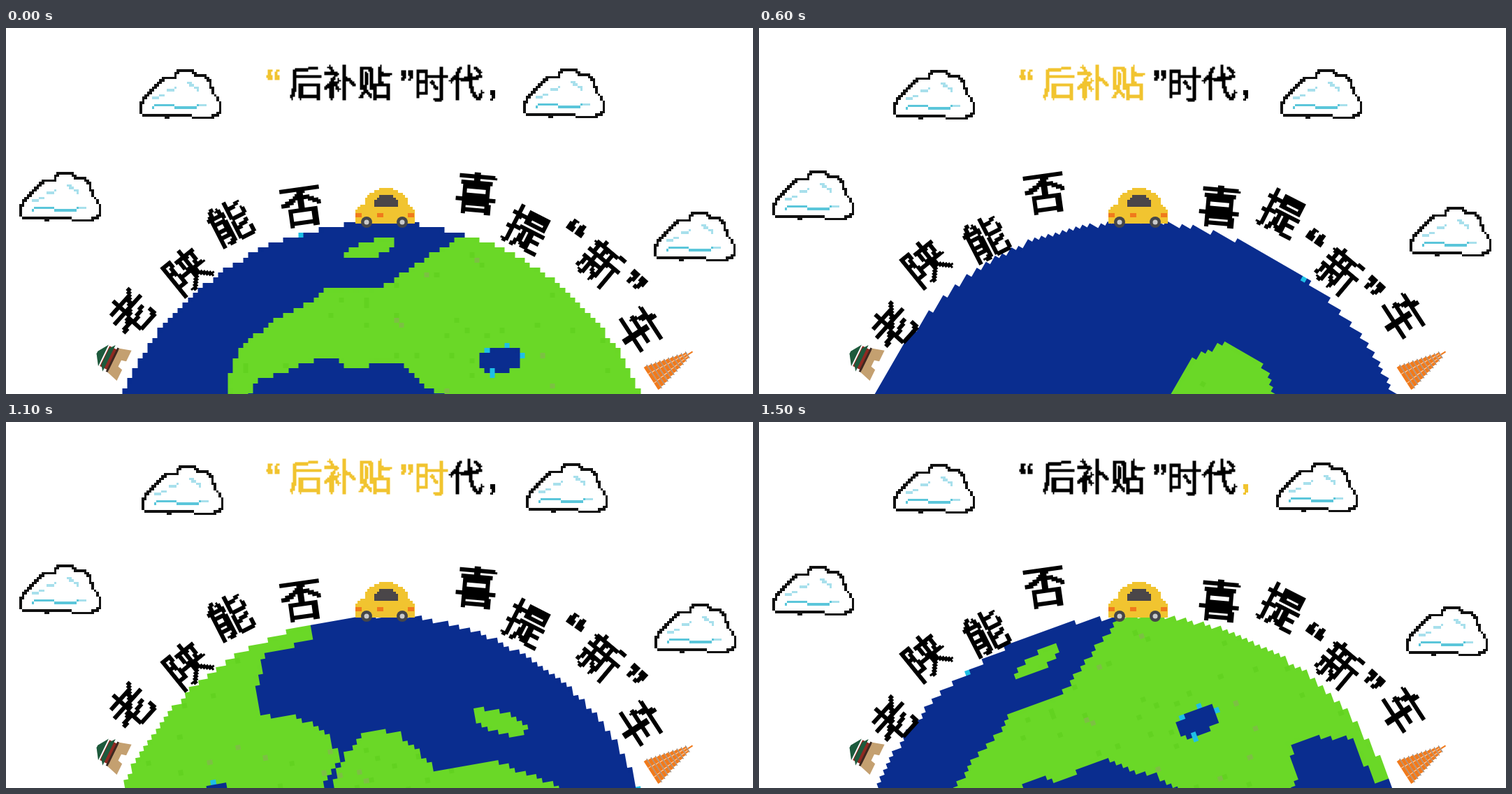
Write an HTML page with a canvas that moves like this. It is 1069 px wide and 524 px high and loops after 1.6 s.

```html
<!DOCTYPE html>
<html lang="zh">
<head>
<meta charset="utf-8">
<style>
  html, body { margin: 0; width: 100%; height: 100%; overflow: hidden; background: #fff; }
  canvas { display: block; }
</style>
</head>
<body>
<canvas id="stage" width="1069" height="524"></canvas>
<script>
const ctx = document.getElementById('stage').getContext('2d');
const GOLD = '#f1c430', BLUE = '#0a2d8f', GREEN = '#6ad827', CYAN = '#1fbfe6', ORANGE = '#f07a1c';
const CENTRE = { x: 537.5, y: 678 };
const rad = deg => deg * Math.PI / 180;
const shape = points => new Path2D('M' + points + 'Z');

function newLayer(w, h) {
  const canvas = document.createElement('canvas');
  canvas.width = w;
  canvas.height = h;
  return canvas.getContext('2d', { willReadFrequently: true });
}

// Paints each [color, paint] layer on a coarse grid with hard edges, then enlarges it.
function pixelate(w, h, cell, layers) {
  const cols = Math.round(w / cell), rows = Math.round(h / cell);
  const small = newLayer(cols, rows);
  for (const [color, paint] of layers) {
    const layer = newLayer(cols, rows);
    layer.scale(1 / cell, 1 / cell);
    layer.fillStyle = layer.strokeStyle = color;
    paint(layer);
    const image = layer.getImageData(0, 0, cols, rows);
    for (let i = 3; i < image.data.length; i += 4) image.data[i] = image.data[i] > 120 ? 255 : 0;
    layer.putImageData(image, 0, 0);
    small.drawImage(layer.canvas, 0, 0);
  }
  const big = newLayer(Math.round(cols * cell), Math.round(rows * cell));
  big.imageSmoothingEnabled = false;
  big.drawImage(small.canvas, 0, 0, cols * cell, rows * cell);
  return big.canvas;
}

// A character centred on its ink.
const isPunctuation = char => char.charCodeAt(0) < 0x3000;
function glyph(char, size, thicken, cell, color) {
  const box = Math.round(size * 1.3 / cell) * cell;
  return pixelate(box, box, cell, [[color, c => {
    c.font = isPunctuation(char)
      ? `700 ${size}px "Liberation Sans", sans-serif`
      : `400 ${size}px "Noto Sans CJK SC", sans-serif`;
    c.lineWidth = thicken;
    const m = c.measureText(char);
    const x = (box + m.actualBoundingBoxLeft - m.actualBoundingBoxRight) / 2;
    const y = (box + m.actualBoundingBoxAscent - m.actualBoundingBoxDescent) / 2;
    c.fillText(char, x, y);
    c.strokeText(char, x, y);
  }]]);
}

function drawCentred(sprite, x, y, deg = 0) {
  ctx.save();
  ctx.translate(x, y);
  ctx.rotate(rad(deg));
  ctx.drawImage(sprite, -sprite.width / 2, -sprite.height / 2);
  ctx.restore();
}

let seed = 7;
const random = () => (seed = seed * 16807 % 2147483647) / 2147483647;

// Globe, coordinates from its centre
const CELL = 7.2, RADIUS = 402, SIZE = 113 * CELL;
function blob(x, y, rx, ry, deg) {
  const path = new Path2D();
  path.ellipse(x, y, rx, ry, rad(deg), 0, 7);
  return path;
}
const disc = blob(0, 0, RADIUS, RADIUS, 0);
const lake = blob(170, -203, 32, 18, -12);
const land = new Path2D();
[
  shape('123,-383 75,-354 -2,-306 -87,-303 -97,-288 -152,-261 -204,-218 -220,-170 -214,-133 -194,-143 ' +
    '-181,-171 -142,-184 -90,-206 -69,-208 -49,-190 -22,-190 -9,-201 23,-202 55,-170 88,-152 147,-74 ' +
    '205,-23 239,-34 277,-77 283,-128 327,-125 368,-105 380,-29 420,-34 400,-300 250,-400'),
  shape('-158,30 -221,29 -261,2 -259,-65 -197,-130 -86,-138 -60,30'),
  shape('208,-17 238,20 226,65 164,108 164,191 112,274 77,298 12,310 -41,211 -41,140 60,60 143,-55'),
  blob(-16, -362, 40, 11, -16),
  blob(215, 209, 41, 15, -62),
].forEach(part => land.addPath(part));

const onGlobe = paint => c => {
  c.translate(SIZE / 2, SIZE / 2);
  c.clip(disc);
  paint(c);
};
const dashes = (path, gap) => onGlobe(c => {
  c.lineWidth = 8;
  c.setLineDash([7, gap]);
  c.stroke(path);
});
const landSpecks = count => onGlobe(c => {
  const snap = v => (Math.round(v / CELL) - .5) * CELL;
  c.clip(land);
  for (let i = 0; i < count; i++) {
    const a = random() * 7, r = 150 + random() * 248;
    c.fillRect(snap(r * Math.cos(a)), snap(r * Math.sin(a)), CELL, CELL);
  }
});
const globe = pixelate(SIZE, SIZE, CELL, [
  [BLUE, onGlobe(c => c.fill(disc))],
  [CYAN, dashes(disc, 70)],
  [GREEN, onGlobe(c => c.fill(land))],
  ['#62d220', landSpecks(150)],
  ['#7cc043', landSpecks(36)],
  [BLUE, onGlobe(c => c.fill(lake))],
  [CYAN, dashes(lake, 18)],
]);

// Cloud, coordinates in cells
const PIXEL = 3.56;
const cloudOutline = shape('0,17 0,14 2,10 5,8 7,5 10,3 14,3 14,1 16,0 21,0 22,2 26,2 28,5 29,9 ' +
  '31,11 32,14 32,17 28,19 21,19 20,18 12,18 10,19 9,18 1,18');
const cloudLight = new Path2D('M5 11H7L8 10H9M11 8H13L14 7M19 5L21 6L22 7H23V8M24 14H26');
const cloudDark = new Path2D('M5 15L6 14H13M14 15H22L23 14');
const inCells = paint => c => {
  c.scale(PIXEL, PIXEL);
  c.translate(.5, .5);
  c.lineWidth = 1.15;
  c.lineCap = 'square';
  paint(c);
};
const cloud = pixelate(33 * PIXEL, 20 * PIXEL, PIXEL, [
  ['#fff', inCells(c => c.fill(cloudOutline))],
  ['#a8e0ec', inCells(c => c.stroke(cloudLight))],
  ['#5bc6da', inCells(c => c.stroke(cloudDark))],
  ['#111', inCells(c => c.stroke(cloudOutline))],
]);
const clouds = [
  { x: 192.4, y: 60, swayX: 2, swayY: 2, peak: 5 },
  { x: 743, y: 58.5, swayX: 3.5, swayY: .8, peak: 3.3 },
  { x: 18.5, y: 205, swayX: 0, swayY: 1, peak: 0 },
  { x: 928.3, y: 260, swayX: 2.5, swayY: -4, peak: 3 },
];
function drawCloud({ x, y, swayX, swayY, peak }, beat) {
  const sway = Math.cos((beat - peak) * Math.PI / 4);
  ctx.drawImage(cloud, Math.round(x + swayX * sway), Math.round(y + swayY * sway));
}

// Title
const title = [
  ['“', 383, 66], ['后', 429, 78], ['补', 478, 78], ['贴', 527, 78],
  ['”', 574, 67], ['时', 610, 78], ['代', 659, 78], [',', 696, 95],
].map(([char, x, y]) => {
  const sprite = color => glyph(char, char === ',' ? 38 : 50, .9, 2.4, color);
  return { x, y, plain: sprite('#000'), lit: sprite(GOLD) };
});

// Characters around the globe: bearing, tilt, resting radius
const HOP = 22, RAISED_FIRST = '老能喜“新”';
const ring = [
  ['老', -53, -48, 429], ['陕', -40, -39, 434], ['能', -28.5, -27, 434], ['否', -15.2, -8, 437],
  ['喜', 17, 5, 441], ['提', 28, 27, 443],
  ['“', 35.5, 35, 461], ['新', 42.7, 40, 443], ['”', 49, 42, 464], ['车', 56.3, 57, 446],
].map(([char, bearing, tilt, radius]) => ({
  bearing, tilt, radius,
  phase: RAISED_FIRST.includes(char) ? 0 : 1,
  sprite: glyph(char, isPunctuation(char) ? 66 : 62, 1.6, 3, '#000'),
}));
function drawRing({ bearing, tilt, radius, phase, sprite }, pose) {
  const a = rad(bearing - pose), r = radius + (pose === phase ? HOP : 0);
  drawCentred(sprite, CENTRE.x + r * Math.sin(a), CENTRE.y - r * Math.cos(a), tilt);
}

// Car
const carBody = shape('0,33 13,21 17,11 37,0 53,0 72,11 75,21 85,34 85,51 0,51');
const carWindow = shape('27,26 29,17 34,12 55,12 61,19 63,26');
const car = pixelate(85, 54, 3.4, [
  [GOLD, c => c.fill(carBody)],
  ['#4a4649', c => c.fill(carWindow)],
]);
function fillShape(color, path) {
  ctx.fillStyle = color;
  ctx.fill(path);
}
function drawCar() {
  ctx.drawImage(car, 500, 229);
  ctx.fillStyle = ORANGE;
  for (const x of [500, 531, 575]) ctx.fillRect(x, 265, 9, 6);
  for (const x of [516, 567]) {
    fillShape('#45464a', blob(x, 278, 8, 8, 0));
    fillShape('#c9cacc', blob(x, 278, 3.5, 3.5, 0));
  }
}

// Buildings, upright in local coordinates
function upright(x, y, deg, paint) {
  ctx.save();
  ctx.translate(x, y);
  ctx.rotate(rad(deg));
  paint();
  ctx.restore();
}
function drawTower() {
  const bar = (color, y, height, half, top = half) =>
    fillShape(color, shape(`${-half},${y} ${-top},${y - height} ${top},${y - height} ${half},${y}`));
  bar('#c4a070', 19, 17, 24, 19);
  bar('#fff', 20, 8, 7, 5);
  bar('#8f2a22', 2, 14, 16);
  bar('#3d2a20', 2, 3, 19);
  bar('#1d5a3c', -5, 6, 21, 13);
  bar('#1d5a3c', -14, 10, 17, 2);
}
function drawPagoda() {
  for (let i = 0; i < 10; i++) {
    const half = 19 - i * 1.6, y = -i * 6.3;
    ctx.fillStyle = '#8a8078';
    ctx.fillRect(-half - 1, y - 6.2, half * 2 + 2, 1.2);
    ctx.fillStyle = ORANGE;
    ctx.fillRect(-half, y - 5, half * 2, 5);
    ctx.fillStyle = '#f9d9bd';
    for (const side of [-.4, .4]) ctx.fillRect(side * half - .5, y - 4.5, 1, 4.5);
  }
  ctx.fillStyle = ORANGE;
  ctx.fillRect(-1, -71, 2, 8);
}

function draw(now) {
  const step = Math.floor(now / 100) % 16, beat = step >> 1, pose = beat >> 1 & 1;
  ctx.fillStyle = '#fff';
  ctx.fillRect(0, 0, 1069, 524);

  // The globe turns faster in the middle of the loop.
  const turn = step * 20 + 10 * Math.min(4, Math.max(0, step - 6));
  drawCentred(globe, CENTRE.x, CENTRE.y, turn);
  clouds.forEach(c => drawCloud(c, beat));
  upright(152, 475, -64, drawTower);
  upright(923, 502, 57, drawPagoda);
  drawCar();
  ring.forEach(c => drawRing(c, pose));

  // Lit characters add up; the last beat lights the comma alone.
  title.forEach(({ x, y, plain, lit }, i) => {
    const on = beat < 7 ? i <= beat : i === 7;
    drawCentred(on ? lit : plain, x, y);
  });
  requestAnimationFrame(draw);
}
requestAnimationFrame(draw);
</script>
</body>
</html>
```
